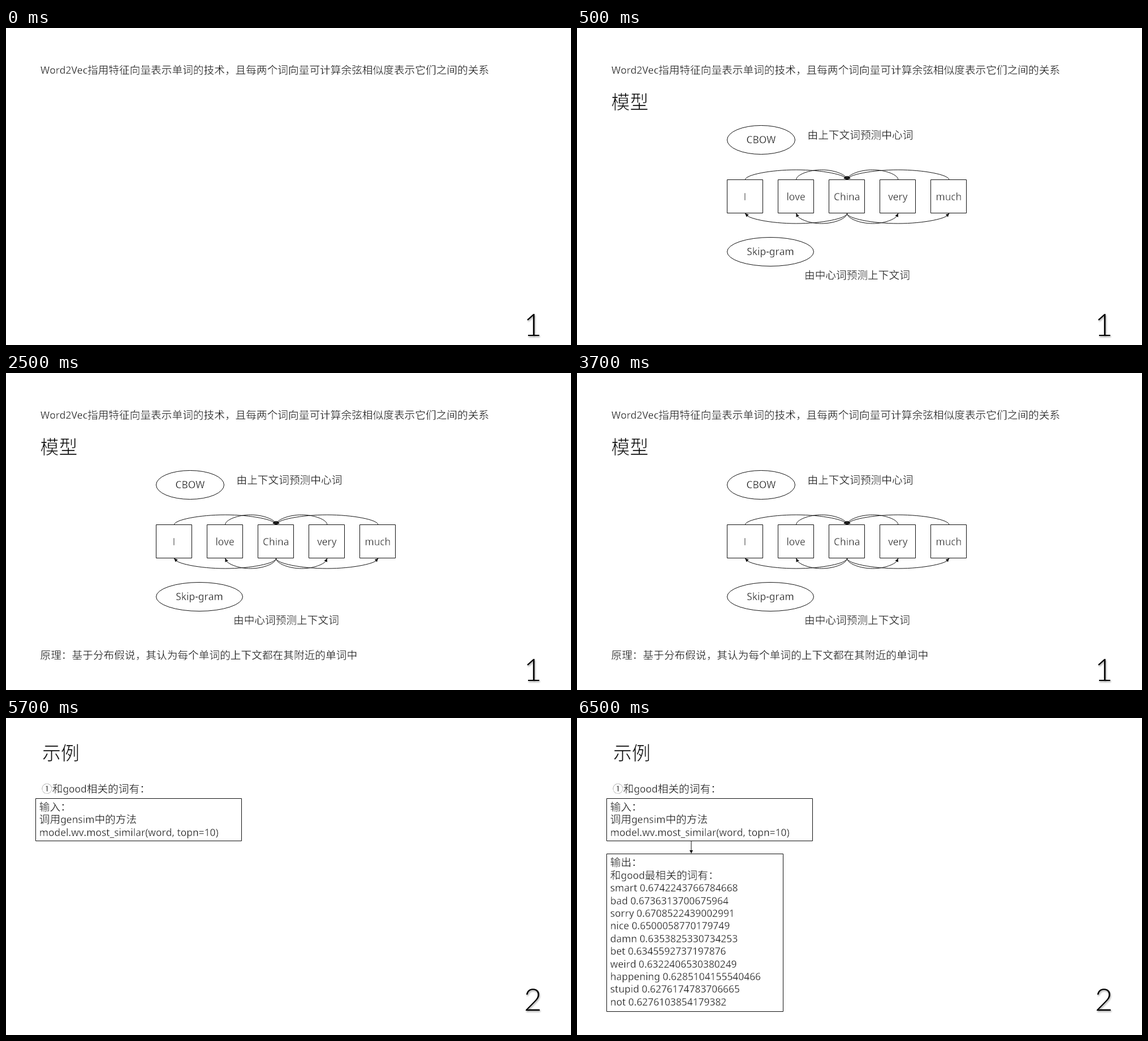
Recreate the animation shown at these times as an HTML page with a canvas. Size 999 px wide and 561 px high, loop 8000 ms.

```html
<!DOCTYPE html>
<html lang="zh-CN">
<head>
<meta charset="utf-8">
<title>Word2Vec</title>
<style>
html, body { margin: 0; width: 100%; height: 100%; overflow: hidden; background: #fff; }
canvas { display: block; width: 999px; height: 561px; }
</style>
</head>
<body>
<canvas id="stage"></canvas>
<script>
const W = 999, H = 561, LOOP = 8000;
const canvas = document.getElementById('stage');
const dpr = window.devicePixelRatio || 1;
canvas.width = Math.round(W * dpr);
canvas.height = Math.round(H * dpr);
const ctx = canvas.getContext('2d');
ctx.scale(dpr, dpr);
ctx.fontKerning = 'none';
ctx.lineJoin = 'round';

const INK = '#111', PAPER = '#fff';
const HAN = '"Noto Sans CJK SC", "Noto Sans CJK", sans-serif';
const LATIN = '"Noto Sans", sans-serif';
const PLAIN = '"Open Sans", sans-serif';
const BODY = 18.69;
const LATIN_RATIO = 0.929;
const THINNING = 0.022;

// Latin and Han runs use separate fonts on one baseline.
// A hairline in the paper colour trims the strokes to a light weight.
function text(str, x, y, { size = BODY, centered = false, latin = LATIN } = {}) {
  const runs = str.match(/[ -~]+|[^ -~]+/g).map(s => {
    const isLatin = /^[ -~]/.test(s);
    const font = isLatin ? `${size * LATIN_RATIO}px ${latin}` : `${size}px ${HAN}`;
    ctx.font = font;
    return { s, font, w: isLatin ? ctx.measureText(s).width : s.length * size };
  });
  if (centered) x -= runs.reduce((sum, r) => sum + r.w, 0) / 2;
  ctx.save();
  ctx.strokeStyle = PAPER;
  ctx.lineWidth = size * THINNING;
  for (const r of runs) {
    ctx.font = r.font;
    ctx.fillText(r.s, x, y);
    ctx.strokeText(r.s, x, y);
    x += r.w;
  }
  ctx.restore();
}

function lines(list, x, y) {
  list.forEach((s, i) => text(s, x, y + i * 22.4));
}

function box(x, y, w, h) {
  ctx.strokeRect(x, y, w, h);
}

function oval(label, x, y, rx, ry) {
  ctx.beginPath();
  ctx.ellipse(x, y, rx, ry, 0, 0, Math.PI * 2);
  ctx.stroke();
  text(label, x, y + 6.4, { centered: true });
}

function arrowHead(x, y, angle) {
  ctx.save();
  ctx.translate(x, y);
  ctx.rotate(angle);
  ctx.beginPath();
  ctx.moveTo(0, 0);
  ctx.lineTo(-6, -3);
  ctx.lineTo(-6, 3);
  ctx.fill();
  ctx.restore();
}

// Curved connector between two points at the same height; h is the signed bulge.
function connector(x0, x1, y, h) {
  const w = x1 - x0, mid = x0 + w / 2, top = y + h;
  ctx.beginPath();
  ctx.moveTo(x0, y);
  ctx.bezierCurveTo(x0, y + h / 2, x0 + w / 4, top, mid, top);
  ctx.bezierCurveTo(x1 - w / 4, top, x1, y + h / 2, x1, y);
  ctx.stroke();
  const u = 0.2, v = 1 - u;
  const dx = 3 * u * u * v * w / 4 + u ** 3 * w / 2;
  const dy = -(3 * u * v * v * h / 2 + 3 * u * u * v * h + u ** 3 * h);
  arrowHead(x1, y, Math.atan2(dy, dx));
}

function pageNumber(n, y) {
  ctx.save();
  ctx.shadowColor = 'rgba(0,0,0,0.4)';
  ctx.shadowBlur = 3 * dpr;
  ctx.shadowOffsetX = dpr;
  ctx.shadowOffsetY = 1.5 * dpr;
  ctx.fillStyle = '#000';
  ctx.font = '300 54.5px Lato, sans-serif';
  ctx.textAlign = 'center';
  ctx.fillText(n, 931.5, y);
  ctx.restore();
}

function models() {
  text('模型', 60.5, 143, { size: 33 });
  oval('CBOW', 325.5, 198, 60, 25.5);
  text('由上下文词预测中心词', 407.5, 196);
  const center = i => 297 + i * 90.1;
  ['I', 'love', 'China', 'very', 'much'].forEach((word, i) => {
    box(Math.round(center(i) - 32) + 0.5, 268.5, 63, 59);
    text(word, center(i), 304.6, { centered: true, latin: PLAIN });
  });
  for (const i of [0, 1, 3, 4]) {
    connector(center(i) + 0.5, center(2) + 0.3, 268.5, -17.5);
    connector(center(2) + 0.3, center(i) + 0.5, 328, 18);
  }
  oval('Skip-gram', 342, 396, 76.5, 25.5);
  text('由中心词预测上下文词', 402, 443.5);
}

function theory(t) {
  text('Word2Vec指用特征向量表示单词的技术，且每两个词向量可计算余弦相似度表示它们之间的关系', 61, 81.3);
  if (t >= 500) models();
  if (t >= 2500) text('原理：基于分布假说，其认为每个单词的上下文都在其附近的单词中', 60.5, 506);
  pageNumber('1', 545);
}

function output() {
  ctx.beginPath();
  ctx.moveTo(202, 218);
  ctx.lineTo(202, 236);
  ctx.stroke();
  arrowHead(202, 240, Math.PI / 2);
  box(52.5, 240.5, 312, 279);
  lines([
    '输出：',
    '和good最相关的词有：',
    'smart 0.6742243766784668',
    'bad 0.6736313700675964',
    'sorry 0.6708522439002991',
    'nice 0.6500058770179749',
    'damn 0.6353825330734253',
    'bet 0.6345592737197876',
    'weird 0.6322406530380249',
    'happening 0.6285104155540466',
    'stupid 0.6276174783706665',
    'not 0.6276103854179382'
  ], 58.8, 262.4);
}

function example(t) {
  text('示例', 64, 74, { size: 33 });
  text('①和good相关的词有：', 63, 131.6);
  box(52.5, 142.5, 364, 75);
  lines(['输入：', '调用gensim中的方法', 'model.wv.most_similar(word, topn=10)'], 58.8, 164);
  if (t >= 6500) output();
  pageNumber('2', 518);
}

function draw(t) {
  ctx.fillStyle = PAPER;
  ctx.fillRect(0, 0, W, H);
  ctx.fillStyle = ctx.strokeStyle = INK;
  ctx.lineWidth = 1;
  (t < 4500 ? theory : example)(t);
}

const start = performance.now();
function tick() {
  draw((performance.now() - start) % LOOP);
  requestAnimationFrame(tick);
}
tick();
</script>
</body>
</html>
```
